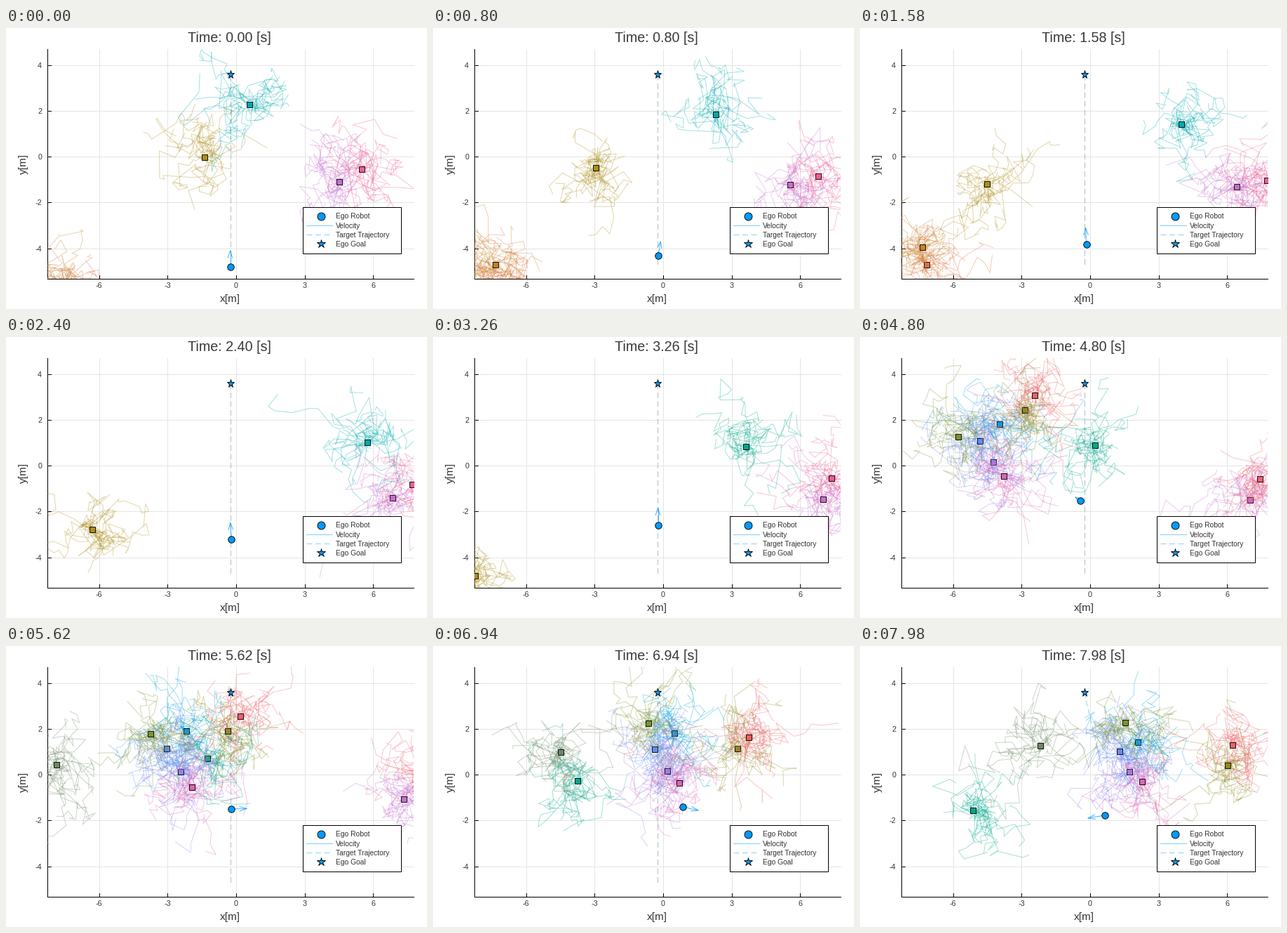
These frames come from a looping animation (600x400 px, 8000 ms). A matplotlib script:

```python
import numpy as np
import matplotlib.pyplot as plt
from matplotlib.animation import FuncAnimation
from matplotlib.collections import LineCollection
from matplotlib.patches import Rectangle

W, H, DPI = 600, 400, 100
FRAMES, STEP = 400, 20
PX = 72 / DPI
LEFT, RIGHT, TOP, BOTTOM = 59, 580.5, 30, 356.5
BLUE, PALE, GREY = "#009afa", "#93cdf0", "#b3bcc3"
GOAL, START = (319.5, 66), (319.5, 339.7)
REPLAN = 7.3
SAMPLES, STEPS, SPREAD = 20, 12, 11.5

plt.rcParams["font.family"] = "Liberation Sans"


def px_x(x):
    return 328 + 32.58 * x


def px_y(y):
    return 183.1 - 32.63 * y


class Track:
    """Cubic Hermite path through timed points."""

    def __init__(self, keys, speed=None):
        keys = np.array(keys, float)
        self.t, self.p = keys[:, 0], keys[:, 1:]
        self.v = np.gradient(self.p, self.t, axis=0) if speed is None else np.array(speed, float)

    def at(self, t):
        i = int(np.clip(np.searchsorted(self.t, t, "right") - 1, 0, len(self.t) - 2))
        h = self.t[i + 1] - self.t[i]
        s = (t - self.t[i]) / h
        a, b = self.p[i], self.p[i + 1]
        u, v = self.v[i] * h, self.v[i + 1] * h
        pos = ((2 * s**3 - 3 * s**2 + 1) * a + (s**3 - 2 * s**2 + s) * u
               + (3 * s**2 - 2 * s**3) * b + (s**3 - s**2) * v)
        vel = ((6 * s**2 - 6 * s) * (a - b) + (3 * s**2 - 4 * s + 1) * u
               + (3 * s**2 - 2 * s) * v) / h
        return pos, vel

    def live(self, t):
        return self.t[0] <= t <= self.t[-1]


robot_path = Track(
    [(0, 319.5, 340), (1.58, 322.5, 307.5), (3.26, 320.5, 267.5), (4.8, 314, 233),
     (5.62, 321, 232), (6.94, 356, 229), (7.98, 349, 241)],
    [(0, -23), (-1, -23), (0, -24), (-7, -5), (22, -0.5), (22, 5), (-24, 4)])


def walker(color, start, end, *points):
    """Person seen from start to end, passing the given timed points."""
    return color, [start, *points, end]


# Colour, first and last timed position, then the positions between.
PEOPLE = [
    walker("#e36f47", (0, 88, 386), (2.3, 84, 315), (1.58, 95, 336.5)),
    walker("#c371d2", (0, 474.5, 219), (6.3, 590, 208), (1.58, 537, 226),
           (3.26, 556, 231), (4.8, 556, 231.5), (5.62, 567, 217.5)),
    walker("#ac8e18", (0, 283, 184), (3.6, 35, 364), (1.58, 180.5, 222), (3.26, 60, 340)),
    walker("#00aaae", (0, 346.5, 108.5), (2.9, 550, 158), (1.58, 457.5, 136.5)),
    walker("#ed5e93", (0, 506.5, 201), (4.2, 569, 201), (1.58, 580, 217), (3.26, 568, 201)),
    walker("#c68225", (0, 82, 363), (2.3, 72, 290), (1.58, 88.5, 311.5)),
    walker("#00a98d", (2.6, 492, 152), (8, 160.6, 234.5), (3.26, 445.5, 156),
           (4.8, 334.5, 154), (5.62, 286.5, 160), (6.94, 206, 191.5)),
    walker("#8e8a1e", (3.6, 115, 82), (8, 525.7, 170), (4.8, 234.5, 104),
           (5.62, 315.5, 120.5), (6.94, 434, 145.5)),
    walker("#00a0dc", (3.5, 107, 128), (8, 397.5, 137.2), (4.8, 199, 124),
           (5.62, 257, 121), (6.94, 343.5, 124)),
    walker("#9b7fe8", (3.6, 100, 171), (8, 384.5, 179), (4.8, 189.5, 177.5),
           (6.94, 334, 178)),
    walker("#618df6", (3.5, 77, 151), (8, 371.5, 150), (4.8, 171, 147.5),
           (6.94, 315.5, 146.5)),
    walker("#f06068", (3.6, 130, 58), (8, 533, 140.7), (4.8, 249, 82.5),
           (5.62, 333.5, 99.5), (6.94, 449.5, 130)),
    walker("#dd65b6", (3.6, 117, 193), (8, 402.5, 193), (4.8, 204.5, 197.5),
           (5.62, 264.5, 200.5), (6.94, 351, 195)),
    walker("#7c9433", (3.5, 36, 163), (8, 379, 108.5), (4.8, 140, 141.5),
           (5.62, 206, 124.5), (6.94, 306.5, 109.5)),
    walker("#f06073", (4.22, 569, 201), (6.3, 615, 180), (4.8, 570, 201.5),
           (5.62, 590, 184)),
    walker("#6f8a66", (4.9, 15, 182), (8, 258.5, 141.8), (5.62, 72, 169),
           (6.94, 182, 150.5)),
]

# Random walks of every frame and person, drawn once so each loop is alike.
rng = np.random.default_rng(7)
moves = rng.standard_normal((FRAMES, len(PEOPLE), SAMPLES, STEPS, 2), dtype=np.float32)
moves *= SPREAD
moves[:, :, :, 0] *= 0.6
WALKS = np.cumsum(moves, axis=3)

fig = plt.figure(figsize=(W / DPI, H / DPI), dpi=DPI, facecolor="white")
ax = fig.add_axes([0, 0, 1, 1])
ax.set_xlim(0, W)
ax.set_ylim(H, 0)
ax.axis("off")
clip = Rectangle((LEFT, TOP), RIGHT - LEFT, BOTTOM - TOP, transform=ax.transData)


def line(xs, ys, color, z, width=1.0, **kw):
    return ax.plot(xs, ys, color=color, lw=width * PX, zorder=z, **kw)[0]


def label(x, y, s, size, ha="center", color="#333333", z=3, **kw):
    return ax.text(x, y, s, fontsize=size * PX, ha=ha, va=kw.pop("va", "center_baseline"),
                   color=color, zorder=z, **kw)


def marker(x, y, shape, size, color, z):
    return ax.plot([x], [y], shape, ms=size * PX, mfc=color, mec="black",
                   mew=0.9 * PX, zorder=z)[0]


def dashed(xs, ys, color, z):
    return line(xs, ys, color, z, dashes=(8, 4.5), dash_capstyle="butt")


def draw_axes():
    for v in (-6, -3, 0, 3, 6):
        x = px_x(v)
        line([x, x], [TOP, BOTTOM], "#e4e4e4", 1)
        line([x, x], [BOTTOM - 5, BOTTOM], "black", 1.5)
        label(x, 366, f"{v}", 10.8)
    for v in (-4, -2, 0, 2, 4):
        y = px_y(v)
        line([LEFT, RIGHT], [y, y], "#e4e4e4", 1)
        line([LEFT, LEFT + 5], [y, y], "black", 1.5)
        label(51, y, f"{v}", 10.8, "right")
    line([LEFT - 0.5, LEFT - 0.5], [TOP, BOTTOM], "black", 1.5)
    line([LEFT - 0.5, RIGHT], [BOTTOM, BOTTOM], "black", 1.5)
    label(319, 384.5, "x[m]", 15.4)
    label(25, 193.5, "y[m]", 15.4, rotation=90, va="center")


def draw_legend():
    ax.add_patch(Rectangle((422.5, 254.5), 140, 66, fc="white", ec="black", lw=PX, zorder=60))
    marker(449, 267.5, "o", 11, BLUE, 61)
    line([428, 464.5], [280.5, 280.5], BLUE, 61, alpha=0.5)
    dashed([428, 464.5], [293.5, 293.5], PALE, 61)
    marker(449, 307.3, "*", 12.5, BLUE, 61)
    names = ("Ego Robot", "Velocity", "Target Trajectory", "Ego Goal")
    for i, name in enumerate(names):
        label(470, 267.4 + 13.3 * i, name, 10.2, "left", z=61)


draw_axes()
draw_legend()
title = label(318.5, 12.5, "", 19.8, color="#3a3a3a")
route = dashed([], [], GREY, 2)
marker(*GOAL, "*", 11.5, BLUE, 50)
shaft = line([], [], BLUE, 51, alpha=0.75)
head = line([], [], BLUE, 51, alpha=0.75)
robot = marker(0, 0, "o", 9.5, BLUE, 52)


class Person:
    def __init__(self, index, color, keys):
        self.index, self.track = index, Track(keys)
        self.walks = LineCollection([], colors=color, linewidths=PX, alpha=0.36,
                                    zorder=5 + 2 * index)
        ax.add_collection(self.walks, autolim=False)
        self.box = marker(0, 0, "s", 8, color, 6 + 2 * index)
        for part in (self.walks, self.box):
            part.set_clip_path(clip)

    def update(self, frame, t):
        seen = self.track.live(t)
        self.walks.set_visible(seen)
        self.box.set_visible(seen)
        if not seen:
            return
        pos, _ = self.track.at(t)
        self.walks.set_segments(list(pos + WALKS[frame, self.index]))
        self.box.set_data([pos[0]], [pos[1]])


people = [Person(i, color, keys) for i, (color, keys) in enumerate(PEOPLE)]


def draw_robot(t):
    pos, vel = robot_path.at(t)
    tip = pos + vel
    size = np.hypot(*vel)
    along = vel / max(size, 1e-6)
    side = np.array([-along[1], along[0]])
    back = tip - along * min(10, 0.45 * size)
    wing = side * min(3.2, 0.2 * size)
    robot.set_data([pos[0]], [pos[1]])
    shaft.set_data(*np.array([pos, tip]).T)
    head.set_data(*np.array([back + wing, tip, back - wing]).T)


def update(frame):
    t = frame * STEP / 1000
    title.set_text(f"Time: {t:.2f} [s]")
    for person in people:
        person.update(frame, t)
    draw_robot(t)
    if t < REPLAN:
        origin, color = START, GREY
    else:
        origin, color = robot_path.at(REPLAN)[0], PALE
    route.set_data([GOAL[0], origin[0]], [GOAL[1], origin[1]])
    route.set_color(color)
    return []


anim = FuncAnimation(fig, update, frames=FRAMES, interval=STEP, init_func=lambda: [],
                     repeat=True, repeat_delay=0)
plt.show()
```
